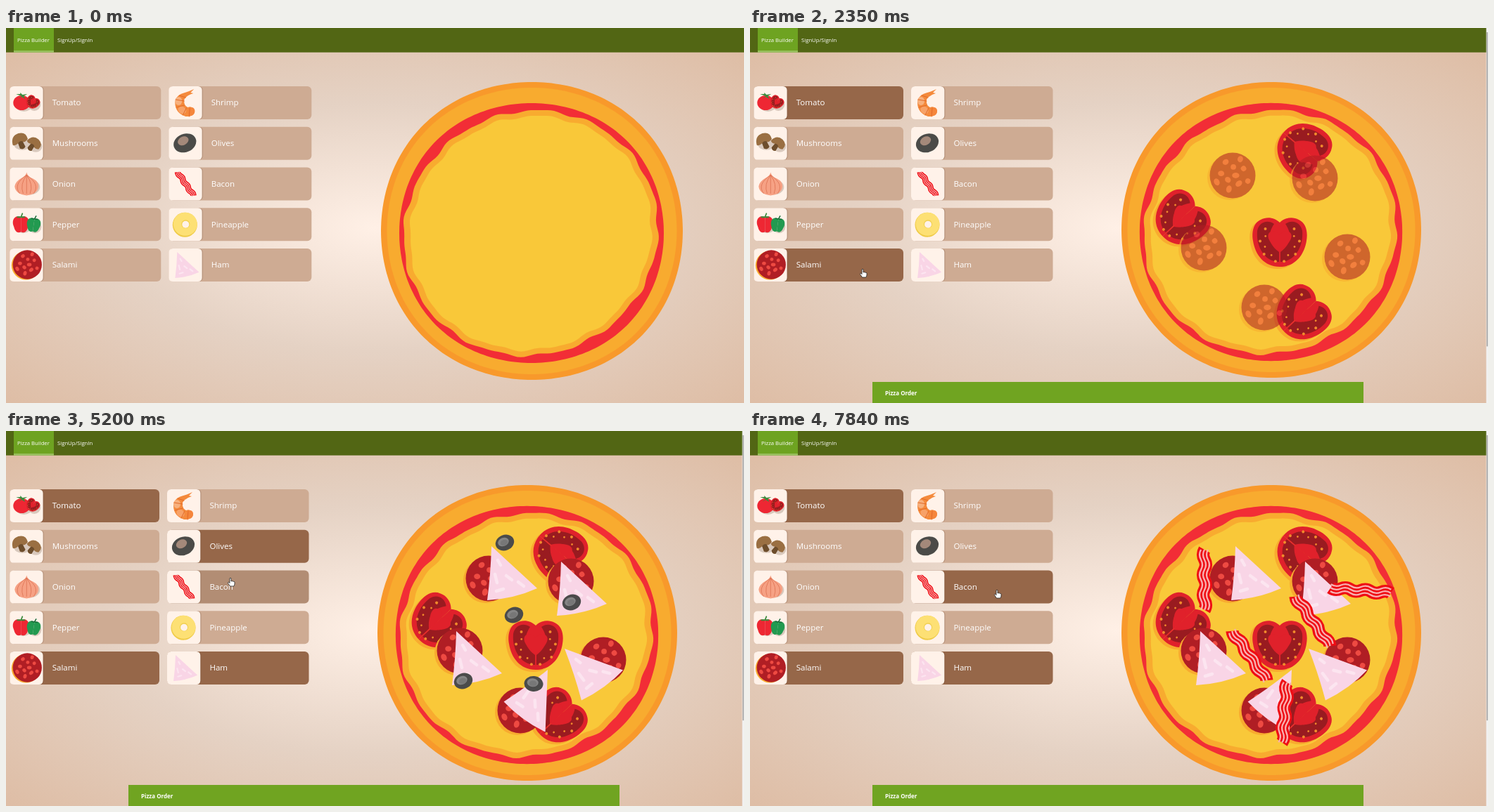
Recreate the animation shown at these times as an HTML page. Size 1049 px wide and 534 px high, loop 8000 ms.

```html
<!DOCTYPE html>
<html lang="en">
<head>
<meta charset="utf-8">
<title>Pizza Builder</title>
<style>
  html, body { margin: 0; width: 100%; height: 100%; overflow: hidden; }
  svg { display: block; width: 1049px; height: 534px; font-family: "Open Sans", sans-serif; }
</style>
</head>
<body>
<svg id="stage" viewBox="0 0 1049 534"></svg>
<script>
const LOOP = 8000, FADE = 620, PITCH = 57.75;
const { sin, cos, sqrt, PI } = Math;
const smooth = u => { u = Math.min(1, Math.max(0, u)); return u * u * (3 - 2 * u); };
const repeat = (n, make) => Array.from({ length: n }, (_, i) => make(i)).join('');

// Drawing helpers
const path = (d, fill, extra = '') => `<path d="${d}" fill="${fill}" ${extra}/>`;
const line = (d, color, width) => path(d, 'none', `stroke="${color}" stroke-width="${width}" stroke-linecap="round"`);
const oval = (x, y, rx, ry, fill, turn = 0) =>
  `<ellipse cx="${x}" cy="${y}" rx="${rx}" ry="${ry}" fill="${fill}" transform="rotate(${turn} ${x} ${y})"/>`;
const rect = (x, y, w, h, fill, extra = '') =>
  `<rect x="${x}" y="${y}" width="${w}" height="${h}" fill="${fill}" ${extra}/>`;
const label = (x, y, size, text, weight = 400) =>
  `<text x="${x}" y="${y}" font-size="${size}" font-weight="${weight}" fill="#fff">${text}</text>`;
const place = (x, y, turn, body, scale = 1) =>
  `<g transform="translate(${x} ${y}) rotate(${turn}) scale(${scale})">${body}</g>`;
const mirror = body => body + `<g transform="scale(-1 1)">${body}</g>`;

// Closed outline around a centre; radius(angle) scales the ellipse.
const ring = (x, y, rx, ry, fill, radius) => path('M' + repeat(240, i => {
  const a = i * PI / 120, r = radius(a);
  return `${(x + rx * r * cos(a)).toFixed(1)} ${(y + ry * r * sin(a)).toFixed(1)} `;
}) + 'Z', fill);

// Pizza base
const round = a => 1 + .006 * (1 - cos(4 * a));
const wavy = a => 1 + .02 * cos(2 * a + 1.4) + .009 * sin(16 * a) + .005 * sin(27 * a + 1);
const base = ring(747.5, 289, 214.5, 212, '#f8992b', round) + ring(747.5, 289, 206, 204, '#f8ab2f', round) +
  ring(747, 292, 188, 185, '#f22d36', round) +
  ring(746, 292, 180, 175, '#f8ab2f', wavy) + ring(746, 292, 171, 167, '#f9c839', wavy);

// Toppings, each drawn around its own origin
const tomatoBody = fill => mirror(path('M0-24C7-31 18-33 27-28C38-23 40-10 38 2C35 22 22 39 0 39Z', fill));
const tomatoSeed = i => {
  const a = -.75 + i * .35, r = i % 2 ? 22 : 28;
  return oval(r * cos(a), 4 + r * sin(a), 2 - i % 2 * .6, 2 - i % 2 * .6, '#f18a2c');
};
const tomato = tomatoBody('#e0212b') +
  mirror(path('M8-22C18-29 30-24 32-12C34 12 20 32 1 32V18C14 8 20-4 8-22Z', '#991b20') + repeat(7, tomatoSeed)) +
  mirror(path('M0 17C10 9 19 0 16-8C12-14 4-13 0-6Z', '#e0212b'));
const salami = oval(0, 0, 32.5, 32.5, '#b01e24') + repeat(11, i => {
  const a = i * 2.4, r = 8 * sqrt(i + .3);
  return oval(r * cos(a), r * sin(a), 5.2 - i % 3 * .7, 3.9, '#ee4a42', i * 47);
});
const ham = path('M0 0L65 60Q32 75-6 77Q-1 40 0 0Z', '#f9d5e6') +
  line('M9 20l4 7M5 40l3 12M21 42l8 6M38 51l8 6M7 64l10-3', '#fce5f0', 4.5);
const olive = oval(0, 0, 13.5, 11, '#4b4b4b', -22) + oval(-2, -1, 8, 6, '#858585', -22) + oval(-1, 0, 5.5, 4, '#777', -22);
const strip = (x, color, width) =>
  path(`M${x}-43q-4 7 0 14.3` + 't0 14.3'.repeat(5), 'none', `stroke="${color}" stroke-width="${width}"`);
const bacon = strip(0, '#ef0d14', 18) + repeat(3, i => strip(i * 5 - 5, '#f8b0b1', 2.3));
const spread = (shape, spots, shadow = '') =>
  spots.map(([x, y, turn = 0]) => (shadow && place(x - 4, y + 3, turn, shadow)) + place(x, y, turn, shape)).join('');

const toppings = {
  Tomato: spread(tomato, [[788, 174, 130], [615, 270, 47], [753, 301], [787, 405, 47]], tomatoBody('#f8ab2f')),
  Salami: spread(salami, [[686, 210], [803, 214], [645, 313], [849, 326], [731, 398]], oval(0, 0, 32, 32, '#f8ab2f')),
  Ham: spread(ham, [[690, 164], [789, 186], [640, 285], [794, 310, -22.5], [770, 340, 49.5]]),
  Olives: spread(olive, [[709, 159], [804, 244], [722, 262], [650, 356], [750, 360, 27]]),
  Bacon: spread(bacon, [[646, 212], [868, 227, 95], [800, 271, -35], [710, 320, -35], [760, 401, 5]])
};

// Menu icons inside a 48 by 47 tile
const shade = '#d9c9bd', leaf = '#3c8a3d';
const mushroom = path('M-12 2Q-11-11 1-11Q12-10 11 1Q5 5 2 2L4 10Q0 14-4 10L-4 2Q-9 5-12 2Z', '#9a6f42') +
  path('M-4 2Q0-1 3 2L4 10Q0 14-4 10Z', '#6d4d2c');
const pepper = (fill, stem) => mirror(path('M0-10C10-14 14-4 10 4C8 12 4 13 0 11Z', fill)) +
  line('M-5-10H5M0-10L2-15', stem, 1.8);
const icons = {
  Tomato: oval(20, 27, 12, 9, shade) + oval(35, 26, 9, 9, shade) + oval(17, 23.5, 12, 10.5, '#ee2733') +
    path('M17 14L9 11L15 11L15 9L18 12L25 11L20 14L22 18L17 15L12 18Z', leaf) +
    place(33, 22, 35, tomato, .25),
  Mushrooms: oval(18, 25, 12, 8, shade) + oval(37, 28, 9, 8, shade) + place(15, 20, -20, mushroom) +
    place(34, 25, 40, mushroom, .9),
  Onion: oval(28, 28, 15, 11, shade) + path('M24 7Q25 13 33 16Q41 20 41 27Q40 38 24 40Q8 38 7 27Q8 20 17 15Q23 12 24 7Z', '#f6a184') +
    repeat(5, i => line(`M24 11Q${4 + i * 10} 24 ${14 + i * 5} 37`, '#dc7252', .8)),
  Pepper: oval(19, 26, 12, 10, shade) + oval(36, 27, 9, 9, shade) +
    place(16, 23, 0, pepper('#ee2733', leaf)) + place(34, 24, 8, pepper('#229a50', '#176a38'), .85),
  Salami: oval(23, 24, 20.5, 20.5, '#f8ab2f') + place(25, 23, 0, salami, .635),
  Shrimp: path('M36 4Q27 8 23 9Q10 12 9 23Q9 38 24 43Q35 44 37 36Q34 27 27 30Q21 27 22 19Q25 13 35 10L31 9Z', '#f48a3c') +
    oval(14, 21, 5, 6, '#f7b07d') + oval(19, 34, 6, 5, '#f7a268', 40) + oval(32, 36, 5, 6, '#f5863c', 20) +
    line('M10 19L22 21M11 30L22 27M20 41L25 31M29 43L30 31M15 13L24 16', '#e26a28', 1),
  Olives: oval(23, 23, 16.5, 13, '#4b4b48', -22) + oval(20.5, 20, 8, 6, '#a4897a', -28),
  Bacon: place(24, 23.5, -34, bacon, .47),
  Pineapple: oval(23, 24, 17.5, 17.5, '#efcb48') + oval(23.5, 23, 17, 16.5, '#fde074') +
    oval(24, 23, 6, 6, '#f1cf4f') + oval(24, 23.5, 5, 5, '#fff2e9'),
  Ham: place(12, 5, 0, ham, .48)
};

// Menu cards: two columns of five
const cards = Object.keys({ Tomato: 0, Mushrooms: 0, Onion: 0, Pepper: 0, Salami: 0, ...icons })
  .map((name, i) => ({ name, right: i > 4, y: 83 + i % 5 * PITCH }));
const card = ({ name, y }) => `<g id="card${name}">` +
  rect(0, y, 215, 47, '#ceab93', 'rx="6" class="bar"') +
  rect(1.5, y, 47, 47, '#6b4a35', 'rx="5.5" opacity=".25"') + rect(0, y, 47.3, 47, '#fff2e9', 'rx="5.5"') +
  `<g transform="translate(0 ${y})">${icons[name]}</g>` + label(60.4, y + 27.3, 11.55, name) + '</g>';

document.getElementById('stage').innerHTML = `
  <defs><radialGradient id="glow" gradientUnits="userSpaceOnUse" cx="0" cy="0" r="1"
    gradientTransform="translate(524 284) scale(741 353)">
    <stop offset="0" stop-color="#fff0e6"/><stop offset=".5" stop-color="#e5d2c4"/><stop offset="1" stop-color="#debda5"/>
  </radialGradient></defs>` +
  rect(0, 0, 1049, 534, 'url(#glow)') + rect(0, 0, 1049, 34.7, '#526614') +
  rect(11, 0, 57, 34.7, '#6ea321') + rect(11, 32.3, 57, 2.4, '#a0c468') +
  label(16, 19.6, 7.7, 'Pizza Builder', 500) + label(73, 19.6, 7.7, 'SignUp/SignIn', 500) +
  cards.map(card).join('') + `<g id="base">${base}</g>` +
  Object.keys(toppings).map(name => `<g id="top${name}">${toppings[name]}</g>`).join('') +
  '<g id="order">' + rect(174, 504, 698, 30, '#70a421') + label(192, 522.8, 8, 'Pizza Order', 700) +
  rect(1046.5, 0, 2.5, 534, '#f1f1f1') + rect(1047, 6, 1.6, 468, '#a5a5a5', 'id="thumb"') + '</g>' +
  '<g id="cursor" stroke="#222" stroke-width=".8" stroke-linejoin="round">' +
  path('M0 0V10.5L2.5 8.2L4.2 12L5.8 11.3L4.2 7.7H7.4Z', '#fff', 'id="arrow"') +
  path('M-1 .8Q0-.6 1 .8V5Q2 4 3 5Q4 4.4 4.6 5.5Q5.8 5 6 6.5V9Q5.5 11 4.8 12H-.6Q-2 9.5-3.6 7.4Q-3.4 5.9-2.2 6.4L-1 7.6Z', '#fff', 'id="hand"') + '</g>';

const el = id => document.getElementById(id);
const show = (id, on) => { el(id).style.display = on ? '' : 'none'; };

// Click times: added at, removed at
const clicks = { Tomato: [1260], Salami: [2010], Ham: [3045], Olives: [4330, 6100], Bacon: [7220] };
// Pointer moves: start, end, x, y
const moves = [
  [130, 260, 848, 416], [460, 970, 150, 108], [1400, 1700, 126, 336], [1700, 1840, 160, 343],
  [2450, 2760, 330, 332], [3880, 4200, 305, 160], [4720, 4970, 319, 209], [5200, 5400, 250, 235],
  [5400, 5680, 434, 240], [5680, 5980, 340, 172], [6550, 6820, 351, 221], [6870, 7050, 351, 226]
];
const pointerAt = t => moves.reduce(([px, py], [from, to, x, y]) => {
  const u = smooth((t - from) / (to - from));
  return [px + (x - px) * u, py + (y - py) * u];
}, [990, 540]);

function draw(t) {
  const ordered = t >= clicks.Tomato[0];
  const [px, py] = pointerAt(t);
  let active = 0, hand = false;

  for (const { name, right, y } of cards) {
    const [on = Infinity, off = Infinity] = clicks[name] || [];
    const selected = t >= on && t < off;
    const x = right ? (ordered ? 229 : 231.3) : 5.3;
    const width = right ? (ordered ? 201.5 : 203) : (ordered ? 212.7 : 215);
    const hover = px > x && px < x + width && py > y && py < y + 47;
    hand ||= hover;
    active += selected;
    const group = el('card' + name), bar = group.querySelector('.bar');
    group.setAttribute('transform', `translate(${x} 0)`);
    bar.setAttribute('width', width);
    bar.setAttribute('fill', selected ? '#966749' : hover ? '#b28d74' : '#ceab93');
    if (clicks[name]) el('top' + name).setAttribute('opacity', smooth((t - on) / FADE) - smooth((t - off) / FADE));
  }

  el('base').setAttribute('transform', ordered ? 'translate(528 77) scale(.993) translate(-533 -77)' : '');
  show('order', ordered);
  el('thumb').setAttribute('height', 468 - 20.6 * Math.max(0, active - 1));
  el('cursor').setAttribute('transform', `translate(${px} ${py})`);
  show('hand', hand);
  show('arrow', !hand);
}

const start = performance.now();
function tick() {
  draw((performance.now() - start) % LOOP);
  requestAnimationFrame(tick);
}
tick();
</script>
</body>
</html>
```
